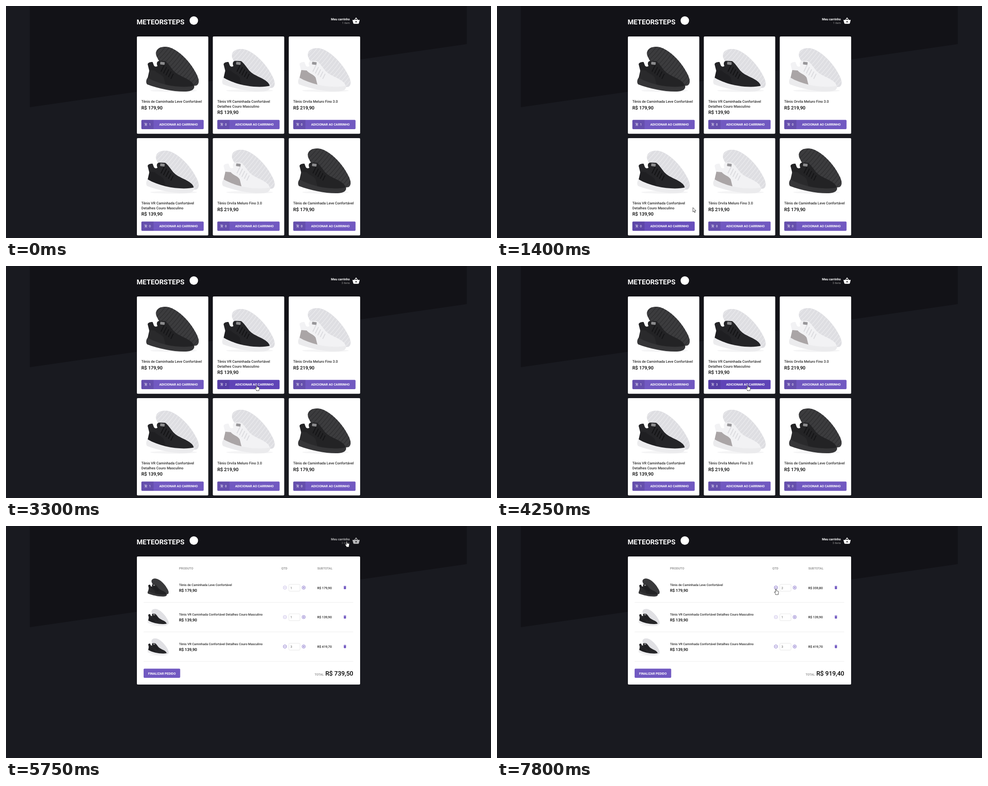
Recreate the animation shown at these times as an HTML page. Size 1082 by 518 pixels, loop 8 s.

```html
<!DOCTYPE html>
<html lang="pt-BR">
<head>
<meta charset="utf-8">
<title>Loja de tênis</title>
<style>
html, body { margin: 0; width: 100%; height: 100%; overflow: hidden; background: #191a20; }
svg { display: block; width: 100%; height: 100%; }
text { font-family: Roboto, sans-serif; text-rendering: geometricPrecision; white-space: pre; }
</style>
</head>
<body>
<svg id="stage" viewBox="0 0 1082 518" xmlns="http://www.w3.org/2000/svg"></svg>
<script>
const LOOP = 8000, STEP = 50, OPEN_CART = 5750;
const PURPLE = [113, 89, 193], DEEP = [95, 68, 183];
const stage = document.getElementById('stage');

const clamp = v => Math.max(0, Math.min(1, v));
const mix = k => `rgb(${PURPLE.map((c, i) => Math.round(c + (DEEP[i] - c) * k))})`;
const money = v => 'R$ ' + v.toFixed(2).replace('.', ',');
// 0..1 hover amount with a 200 ms fade on both sides
const hover = (t, on, off) => clamp((t - on) / 200) - clamp((t - off) / 200);

const text = (x, y, size, weight, fill, str, extra = '') =>
  `<text x="${x}" y="${y}" font-size="${size}" font-weight="${weight}" fill="${fill}" ${extra}>${str}</text>`;
const rect = (x, y, w, h, fill, r = 0, extra = '') =>
  `<rect x="${x}" y="${y}" width="${w}" height="${h}" rx="${r}" fill="${fill}" ${extra}/>`;
const MIDDLE = 'text-anchor="middle"', END = 'text-anchor="end"';

// Shoes
const SOLE = 'M43 42C40 28 52 22 66 23C88 25 118 54 132 82C138 93 141 104 134 109C128 112 112 108 102 104C76 92 52 64 43 42Z';
const UPPER = 'M24 62C25 58 30 57 35 57L37 62C38 67 42 69 46 66C43 60 45 55 50 54.5L63 55C70 60 76 70 82 77' +
  'C92 88 112 92 122 102C127 107 128 112 126 116C90 120 45 114 23 103C22 95 28 86 28 78Z';
const HEEL = 'M28 75L40 76C47 84 55 84 60 92L64 108C48 106 33 102 23 97Z';
const STRIP = 'M24 92C20 97 20 104 23 107C50 117 84 124 110 123C123 122 129 118 128 110C104 116 56 111 24 92Z';

const looks = {
  black: { sole: '#3c3c3e', ridge: '#313133', upper: '#232325', heel: '#2a2a2c', strip: '#363638', tag: '#8b8b8d', lace: '#131315', drop: 0 },
  mixed: { sole: '#dedee2', ridge: '#e8e8eb', upper: '#252528', heel: '#1f1f22', strip: '#ececee', tag: '#8b8b8d', lace: '#111113', drop: 5 },
  white: { sole: '#dedee2', ridge: '#e8e8eb', upper: '#f2f2f4', heel: '#aaa5a6', strip: '#ebebed', tag: '#98979a', lace: '#dadade', drop: 3 }
};

function shoe(name) {
  const c = looks[name];
  let ridges = '', laces = '';
  for (let i = 0; i < 17; i++) {
    const x = 48 + i * 5.4, y = 27 + i * 5;
    ridges += `M${x - 22} ${y + 24}Q${x + 3} ${y + 4} ${x + 18} ${y - 20}`;
  }
  for (let i = 0; i < 5; i++)
    laces += `M${61 + i * 5} ${64 + i * 5}L${54 + i * 5.5} ${78 + i * 4}`;
  return `<g id="${name}">
    <ellipse cx="82" cy="121" rx="52" ry="3" fill="#f4f4f5"/>
    <g transform="translate(0 ${c.drop})">
      <path d="${SOLE}" fill="${c.sole}"/>
      <path d="${ridges}" fill="none" stroke="${c.ridge}" stroke-width="1.8" clip-path="url(#soleClip)"/>
    </g>
    <path d="${UPPER}" fill="${c.upper}"/>
    <path d="${HEEL}" fill="${c.heel}"/>
    <path d="${laces}" fill="none" stroke="${c.lace}" stroke-width="1.8" stroke-linecap="round"/>
    <path d="${STRIP}" fill="${c.strip}"/>
    ${rect(52, 57, 10, 6, c.tag, 1, 'transform="rotate(8 57 60)"')}
  </g>`;
}

// Icons
const cartIcon = `<path d="M1 3H4L8 12H16.5L20.5 4.5M8 12L6 15.8H19M12 1V9M8 5H16" fill="none" stroke="#fff" stroke-width="2"/>
  <circle cx="7" cy="20" r="2" fill="#fff"/><circle cx="17" cy="20" r="2" fill="#fff"/>`;
const basket = `<path fill="#fff" fill-rule="evenodd" d="M17.2 9L12.8 2.4Q12 1.6 11.2 2.4L6.8 9H2Q.8 9 1 10.3L3.6 19.5Q4 21 5.5 21H18.5Q20 21 20.4 19.5L23 10.3Q23.2 9 22 9ZM9 9L12 4.6L15 9ZM12 17A2 2 0 1 1 12 13A2 2 0 1 1 12 17Z"/>`;
const bin = `<path fill="#7159c1" d="M6 19Q6 21 8 21H16Q18 21 18 19V7H6ZM19 4H15.5L14.5 3H9.5L8.5 4H5V6H19Z"/>`;
const round = (id, x, y, plus, color, alpha = 1) =>
  `<g id="${id}" transform="translate(${x} ${y})" fill="none" stroke="${color}" stroke-width=".85" opacity="${alpha}">
    <circle r="3.66"/><path d="M-2 0H2${plus ? 'M0 -2V2' : ''}"/></g>`;

// Home page
const walk = { look: 'black', lines: ['Tênis de Caminhada Leve Confortável'], price: 179.9 };
const couro = { look: 'mixed', lines: ['Tênis VR Caminhada Confortável', 'Detalhes Couro Masculino'], price: 139.9 };
const lite = { look: 'white', lines: ['Tênis Orvila Meluro Fino 3.0'], price: 219.9 };
const grid = [walk, couro, lite, couro, lite, walk];
const spot = i => [292 + (i % 3) * 169.4, i < 3 ? 68 : 295];

function card(p, i) {
  const [x, y] = spot(i), extra = (p.lines.length - 1) * 10.4;
  return `<g transform="translate(${x} ${y})">
    ${rect(0, 0, 159.3, 217.3, '#fff', 2)}
    <use href="#${p.look}"/>
    ${p.lines.map((s, n) => text(10, 148.3 + n * 10.4, 7.97, 500, '#2a2a2a', s)).join('')}
    ${text(10, 163 + extra, 10.5, 500, '#000', money(p.price))}
    ${rect(10, 186.2, 139, 20.8, '#7159c1', 2, `id="btn${i}"`)}
    <path d="M12 186.2H37.2V207H12Q10 207 10 205V188.2Q10 186.2 12 186.2Z" fill="#000" opacity=".1"/>
    <g transform="translate(16.2 192.6) scale(.326)">${cartIcon}</g>
    ${text(27, 199.3, 7, 400, '#fff', i ? 0 : 1, `id="count${i}"`)}
    ${text(92.9, 199.3, 7.08, 700, '#fff', 'ADICIONAR AO CARRINHO', MIDDLE)}
  </g>`;
}

// Cart page
const lines = [[walk, 1], [couro, 1], [couro, 3]];

function row([p, n], i) {
  return `<g transform="translate(0 ${i * 65.8})">
    <use href="#${p.look}" transform="translate(307.6 108.2) scale(.4)"/>
    ${text(386, 134, 6.97, 500, '#2a2a2a', p.lines.join(' '))}
    ${text(386, 147, 8.94, 500, '#000', money(p.price))}
    ${round('minus' + i, 622.2, 137.5, false, '#7159c1', n > 1 ? 1 : .5)}
    ${rect(631, 130.3, 25, 15.2, '#fff', 2, 'stroke="#ddd" stroke-width=".7"')}
    ${text(634.4, 140.7, 7, 400, '#666', n, `id="qty${i}"`)}
    ${round('plus' + i, 664.1, 137.5, true, '#7159c1')}
    ${text(694.5, 140.7, 7.17, 500, '#222', money(p.price * n), `id="sub${i}"`)}
    <g transform="translate(751.2 132.5) scale(.407)">${bin}</g>
    ${rect(307, 170.3, 467.6, .7, '#e6e6e6')}
  </g>`;
}

stage.innerHTML = `
  <defs><clipPath id="soleClip"><path d="${SOLE}"/></clipPath>${Object.keys(looks).map(shoe).join('')}</defs>
  ${rect(0, 0, 1082, 518, '#191a20')}
  <path d="M53 0H1028V85L53 226Z" fill="#121217"/>
  ${text(291.5, 41, 15.2, 700, '#fff', 'METEORSTEPS')}
  <circle cx="419" cy="32.5" r="9.5" fill="#fff"/>
  <g id="link">
    ${text(767, 32, 7.05, 700, '#fff', 'Meu carrinho', END)}
    ${text(767, 40.3, 6.2, 400, '#999', '', `id="items" ${END}`)}
    <g transform="translate(772.2 24.3) scale(.733)">${basket}</g>
  </g>
  <g id="home">${grid.map(card).join('')}</g>
  <g id="cart">
    ${rect(292, 68, 498, 286, '#fff', 2)}
    ${text(386, 97.3, 6.95, 700, '#999', 'PRODUTO')}
    ${text(614.3, 97.3, 6.95, 700, '#999', 'QTD')}
    ${text(694.4, 97.3, 6.85, 700, '#999', 'SUBTOTAL')}
    ${lines.map(row).join('')}
    ${rect(307, 318.6, 81.6, 20.5, '#7159c1', 2)}
    ${text(347.8, 331.5, 7.05, 700, '#fff', 'FINALIZAR PEDIDO', MIDDLE)}
    ${text(709, 334, 6.8, 700, '#999', 'TOTAL', END)}
    ${text(774.6, 333.9, 13.8, 500, '#000', '', `id="total" ${END}`)}
  </g>
  <g id="pointer" fill="#fff" stroke="#000" stroke-width=".7" stroke-linejoin="round">
    <path id="arrow" d="M0 0V9.8L2.2 7.8L3.8 11.3L5.4 10.6L3.9 7.2H6.8Z"/>
    <path id="hand" d="M-.9 .9Q0 -.5 .9 .9V4.7L4.9 5.5Q6.2 5.9 6 7.4L5.2 11V13.2H-.9V11.5L-3.4 8.2Q-3.9 6.7 -2.6 6.7L-.9 8.2Z"/>
  </g>`;

const $ = {};
stage.querySelectorAll('[id]').forEach(el => $[el.id] = el);
const show = (el, on) => el.setAttribute('display', on ? 'inline' : 'none');

// Pointer: time, x, y, easing into the point
const smooth = p => p * p * (3 - 2 * p), out = p => p * (2 - p), even = p => p;
const path = [
  [50, 9, -11, even], [900, 408, 490, smooth],
  [1200, 408, 490, even], [1400, 437, 450, even], [2000, 548, 298, out],
  [2050, 548, 298, even], [2200, 551.3, 271.5, even], [2400, 559.3, 265.3, out],
  [4250, 559.3, 265.3, even], [4450, 575, 286, smooth], [5050, 740, 62, smooth],
  [5100, 740, 62, even], [5300, 760, 33.8, out],
  [6100, 760, 33.8, even], [6900, 666, 139.5, smooth],
  [7250, 666, 139.5, even], [7550, 624, 140, smooth],
  [7650, 624, 140, even], [7800, 622.3, 140, even]
];

function pointerAt(t) {
  const n = path.findIndex(k => k[0] > t);
  if (n === 0) return path[0].slice(1, 3);
  if (n < 0) return path[path.length - 1].slice(1, 3);
  const a = path[n - 1], b = path[n], p = b[3]((t - a[0]) / (b[0] - a[0]));
  return [a[1] + (b[1] - a[1]) * p, a[2] + (b[2] - a[2]) * p];
}

const inside = (x, y, l, top, w, h) => x >= l && x <= l + w && y >= top && y <= top + h;

function clickable(x, y, inCart) {
  if (inside(x, y, 725, 24, 65, 18)) return true;
  if (inCart) return inside(x, y, 617, 132, 10, 11) || inside(x, y, 659, 132, 10, 11);
  return grid.some((p, i) => inside(x, y, spot(i)[0] + 10, spot(i)[1] + 186, 139, 21));
}

function draw(t) {
  const inCart = t >= OPEN_CART;
  show($.home, !inCart);
  show($.cart, inCart);

  const added = [2650, 3300, 3800].filter(c => t >= c).length;
  $.count3.textContent = t >= 1500 ? 1 : 0;
  $.count1.textContent = added;
  $.items.textContent = added ? '3 itens' : t >= 1500 ? '2 itens' : '1 item';
  $.btn3.setAttribute('fill', mix(hover(t, 700, 1300)));
  $.btn1.setAttribute('fill', mix(hover(t, 2200, 4350)));
  $.link.setAttribute('opacity', 1 - .3 * hover(t, 5200, 6200));

  const qty = t >= 7150 ? 2 : 1;
  $.qty0.textContent = qty;
  $.sub0.textContent = money(walk.price * qty);
  $.total.textContent = money(walk.price * qty + couro.price * 4);
  $.minus0.setAttribute('opacity', qty > 1 ? 1 : .5);
  $.minus0.setAttribute('stroke', mix(hover(t, 7500, 9000)));
  $.plus0.setAttribute('stroke', mix(hover(t, 6800, 7350)));

  const [x, y] = pointerAt(t), hand = clickable(x, y, inCart);
  $.pointer.setAttribute('transform', `translate(${x} ${y})`);
  show($.hand, hand);
  show($.arrow, !hand);
}

const start = performance.now();
function tick() {
  const t = (performance.now() - start) % LOOP;
  draw(Math.floor(t / STEP) * STEP);
  requestAnimationFrame(tick);
}
tick();
</script>
</body>
</html>
```
